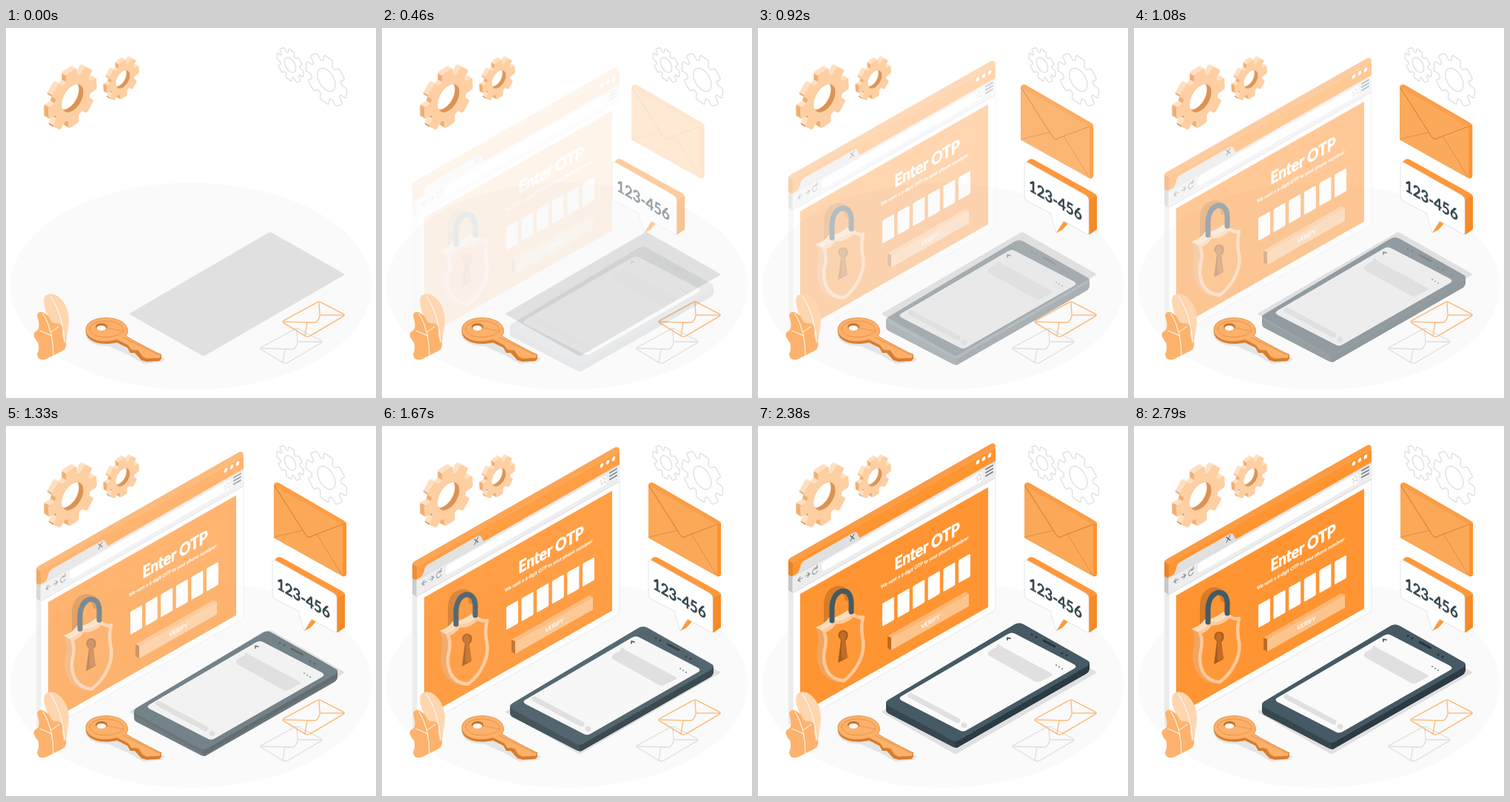
An HTML page that plays this animation: 500 px wide and 500 px high, repeating every 2830 ms.

```html
<!DOCTYPE html>
<html lang="en">
<head>
<meta charset="utf-8">
<title>Enter OTP</title>
<style>
html, body { margin: 0; width: 100%; height: 100%; overflow: hidden; background: #fff; }
svg { display: block; width: 100vw; height: 100vh; }
text { font-family: Lato, "Open Sans", sans-serif; font-weight: 700; stroke-linejoin: round; }
.line { fill: none; stroke-linecap: round; stroke-linejoin: round; }
</style>
</head>
<body>
<svg viewBox="0 0 500 500">
  <defs>
    <g id="letter" class="line">
      <path d="M376 395L420 371Q423 369 426 371L455 386Q459 388 455 390L411 416Q408 418 404 416L376 399Q372 397 376 395Z"/>
      <path d="M423 371L424 388L457 388M375 397L418 398Q422 397 424 389M404 416L407 398"/>
    </g>
  </defs>

  <ellipse cx="250" cy="349" rx="244" ry="140" fill="#fafafa"/>
  <path d="M170 384L354 277Q357 275 360 277L455 331Q459 333 455 335L270 442Q267 444 264 442L169 388Q165 386 170 384Z" fill="#e0e0e0"/>
  <g id="gears"></g>
  <use href="#letter" x="-30" y="36" stroke="#dedede" stroke-width="1.3"/>
  <use href="#letter" stroke="#fdbe83" stroke-width="1.5"/>

  <g id="browser">
    <path d="M41 224L47 228V407L41 404Z" fill="#ebebeb"/>
    <path d="M41 202L47 205V228L41 224Z" fill="#c7c7c7"/>
    <path d="M41 183L47 187V206L41 203Z" fill="#e98326"/>
    <path d="M41 184Q41 182 44 180L315 26Q321 24 321 31L47 187Z" fill="#fb9c44"/>
    <g transform="matrix(1 -.568 0 1 0 182.3)">
      <path d="M47 49H321V246Q321 251 316 251H47Z" fill="#fff" stroke="#e8e8e8"/>
      <path d="M47 31H317Q321 30 321 34V50H47Z" fill="#ff9530"/>
      <path d="M47 49H321V72H47Z" fill="#ededed"/>
      <path d="M50 51Q55 49 57 43Q58 37 62 37H129Q133 37 135 43Q137 50 142 51Z" fill="#e0e0e0"/>
      <path d="M47 50H321M47 72H321" stroke="#dcdcdc" stroke-width="1.2"/>
      <rect x="86" y="53" width="218" height="13" rx="5" fill="#fff"/>
      <g class="line" stroke="#8b9499" stroke-width="1.2">
        <path d="M125 39L130 46M130 39L125 46" stroke="#5d6970"/>
        <path d="M60 59H54M57 56L54 59L57 62M64 59H70M67 56L70 59L67 62M79 56A3.3 4 0 1 0 80 61M80 53V57H77"/>
        <path d="M299 54L300 57H303L301 60L302 63L299 61L296 63L297 60L295 57H298Z" stroke="#d0d0d0" stroke-width=".8"/>
        <path d="M308 53H317M308 57.500H317M308 62H317" stroke="#78838a" stroke-width="2"/>
      </g>
      <g fill="#fff">
        <ellipse cx="297" cy="37" rx="2.300" ry="2.800"/>
        <ellipse cx="305" cy="37" rx="2.300" ry="2.800"/>
        <ellipse cx="313" cy="37" rx="2.300" ry="2.800"/>
      </g>
      <rect x="57" y="79" width="254" height="162" fill="#ff9432"/>
      <g fill="#fff" stroke="#fff">
        <text transform="translate(184.500 119.500) scale(.866 1)" font-size="22" font-weight="900" stroke-width="1">Enter OTP</text>
        <text transform="translate(166 134) scale(.866 1)" font-size="6.800" stroke-width=".15">We sent a 6 digit OTP to your phone numbrer</text>
      </g>
      <g id="boxes" fill="#fff"></g>
      <path d="M175 203H280L285 208L180 208Z" fill="#fdb674"/>
      <path d="M175 203L180 208V225L175 219Z" fill="#bd6b22"/>
      <rect x="180" y="208" width="105" height="17" fill="#fdc48d"/>
      <text transform="translate(233 219.500) scale(.866 1)" font-size="8.500" text-anchor="middle" fill="#fff">VERIFY</text>
    </g>
    <path class="line" d="M93 266V242Q94 225 107 222Q119 221 121 234" stroke="#d67b29" stroke-width="8"/>
    <path d="M78 274Q90 270 96 261Q107 262 121 251Q132 258 144 259L117 348Q99 350 88 337Q77 322 80 303Q84 287 78 274Z" fill="#f0a560"/>
    <path d="M78 274Q90 270 96 261Q107 262 121 251L130 256Q118 268 104 266Q98 276 87 279Z" fill="#fedcbc"/>
    <path d="M89 279Q99 276 104 267Q117 269 129 257Q136 262 142 260Q139 272 141 286Q145 302 138 318Q130 336 116 346Q100 345 93 332Q86 317 91 300Q93 289 89 279Z" fill="#ff9838" stroke="#fec99a" stroke-width="4.500" stroke-linejoin="round"/>
    <path class="line" d="M100 265V247Q101 229 113 225Q125 224 126 239V253" stroke="#455a64" stroke-width="7"/>
    <path d="M112 291Q106 286 110 280Q116 275 121 281Q123 288 118 292L121 315L108 322Z" fill="#a85c1c"/>
    <path d="M113 291Q108 286 112 281L115 279Q122 282 117 292L121 315L113 317Z" fill="#c16d27"/>
  </g>

  <g id="phone">
    <path d="M173 375V385Q173 389 177 391L262 435Q267 438 272 435L443 337Q448 334 448 329V322Z" fill="#37474f"/>
    <path d="M267 426V437Q270 437 272 435L443 337Q448 334 448 329V322Z" fill="#2b3b43"/>
    <path d="M176 372L345 271Q352 266 359 270L444 318Q452 322 444 327L273 426Q267 430 261 426L176 380Q170 376 176 372Z" fill="#455a64"/>
    <path d="M194 367L338 283Q343 280 348 283L427 324Q432 327 427 330L282 413Q277 416 272 413L194 373Q189 370 194 367Z" fill="#fafafa"/>
    <path d="M314 305L322 301L324 296L329 300L396 336Q400 338 396 340L382 347Q378 349 374 347L313 313Q308 309 314 305Z" fill="#e0e0e0"/>
    <path class="line" d="M206 366L270 400M278 406L279 406.500" stroke="#e0e0e0" stroke-width="7"/>
    <g class="line" stroke="#263238" stroke-width="2.800">
      <path d="M386 292L401 300M370 284h.1M376 287h.1M411 309h.1M417 312h.1"/>
      <path d="M341 289L337 288L337 291M403 325h.1M407 327.500h.1M411 330h.1" stroke-width="1.700" stroke="#45545c"/>
    </g>
  </g>

  <g id="envelope">
    <path d="M360 79Q362 75 367 77L455 128Q458 130 458 133V200Q457 204 453 203L360 151Z" fill="#fb9d45"/>
    <path d="M453 133L458 130V200Q457 204 453 203Z" fill="#ff912c"/>
    <path d="M360 80L453 133V203L360 151Z" fill="#fba858"/>
    <path class="line" d="M361 81L403 147Q407 153 413 148L453 133" stroke="#d98637" stroke-width="1.300"/>
    <path class="line" d="M361 150L399 141M418 146L452 201" stroke="#df8b3c"/>
  </g>

  <g id="bubble">
    <path d="M360 184L366 178Q369 176 373 178L454 223Q458 225 458 229V272L448 279L420 263L411 273L403 277L400 250L362 230Z" fill="#ff983a"/>
    <path d="M447 233L458 227V272L448 279Z" fill="#f58a27"/>
    <path d="M360 185Q360 180 365 182L443 226Q447 229 447 233V276Q447 280 443 278L413 261L403 277L395 250L364 234Q360 232 360 228Z" fill="#fff" stroke="#dedede" stroke-width=".8"/>
    <text transform="matrix(.866 .5 0 1 366 219.500)" font-size="21.500" fill="#37474f" stroke="#37474f" stroke-width=".3">123-456</text>
  </g>

  <g id="plant">
    <path d="M54 361Q68 354 80 374Q88 389 83 411L80 435L66 437Q67 409 55 385Q48 367 54 361Z" fill="#fed6b0"/>
    <path d="M42 389Q43 383 49 384Q57 387 60 394Q62 400 70 399Q78 401 76 410Q75 419 81 425Q83 432 75 437Q65 442 53 448Q43 450 42 441Q46 432 43 425Q34 414 40 410Q48 407 42 389Z" fill="#fdb36d"/>
    <path class="line" d="M60 362Q78 390 79 425M50 386Q64 408 64 442M61 411L72 403M62 416L46 409" stroke="#fff" stroke-width="1"/>
  </g>

  <g id="key">
    <path d="M107 411Q108 430 139 430L166 442L186 454L211 451L215 447L165 417Z" fill="#e5e5e5"/>
    <path d="M108 408V412C110 424 128 430 150 425L164 432L168 439L174 439L183 449L190 451L207 450L210 447V441Z" fill="#d87d2d"/>
    <path d="M108 407C109 388 152 387 162 402Q167 410 162 416L168 420L210 442L208 446L190 447L184 444L179 436L169 435L165 429L150 421C128 428 107 420 108 407Z" fill="#fdb069" stroke="#d98739" stroke-width=".8"/>
    <path d="M113 407C114 393 149 392 158 405C164 418 117 425 113 407ZM158 418L207 442" class="line" stroke="#e4944d" stroke-width="1"/>
    <path d="M136 405L160 410" stroke="#e4944d" stroke-width=".8"/>
    <ellipse cx="129" cy="404" rx="8" ry="5" fill="#c87427"/>
    <ellipse cx="129" cy="405.500" rx="6.500" ry="3.500" fill="#fafafa"/>
  </g>
</svg>
<script>
const LOOP = 2830;
const $ = id => document.getElementById(id);

// Points of a gear or circle, laid on an isometric wall that leans up (-1) or down (1) to the right.
const onWall = (cx, cy, lean) => (r, a) => [
  cx + .866 * r * Math.cos(a),
  cy + r * Math.sin(a) + lean * .5 * r * Math.cos(a)
];
const outline = points => "M" + points.map(p => p.map(v => v.toFixed(1)).join(" ")).join("L") + "Z";

function gearShape(cx, cy, radius, hole, lean, phase) {
  const place = onWall(cx, cy, lean), step = Math.PI / 4;
  const rim = [], bore = [];
  for (let i = 0; i < 8; i++) {
    const a = i * step + phase;
    for (const [r, d] of [[.75, -.3], [.97, -.22], [1, -.16], [1, .16], [.97, .22], [.75, .3]])
      rim.push(place(radius * r, a + d));
  }
  for (let i = 0; i < 32; i++) bore.push(place(hole, i * Math.PI / 16));
  return { rim, bore };
}

// Sides of an extruded outline that face the viewer.
function walls(points, [dx, dy], inside) {
  return points.map((p, i) => {
    const q = points[(i + 1) % points.length];
    const nx = q[1] - p[1], ny = p[0] - q[0];
    if ((nx * dx + ny * dy > 0) === inside) return "";
    const top = -ny / Math.hypot(nx, ny);
    const fill = inside ? "#dc904e" : top > .45 ? "#ffdfc0" : top > -.1 ? "#f3ae70" : "#dc904e";
    const quad = outline([p, q, [q[0] + dx, q[1] + dy], [p[0] + dx, p[1] + dy]]);
    return `<path d="${quad}" fill="${fill}" stroke="${fill}" stroke-width=".3"/>`;
  }).join("");
}

function solidGear(cx, cy, radius, hole, depth) {
  const { rim, bore } = gearShape(cx, cy, radius, hole, -1, -.05);
  const back = [-depth, -depth * .577];
  return walls(rim, back, false) + walls(bore, back, true) +
    `<path d="${outline(rim) + outline(bore)}" fill="#fdcfa2" fill-rule="evenodd"/>`;
}

function lineGear(cx, cy, radius, hole) {
  const { rim, bore } = gearShape(cx, cy, radius, hole, 1, .1);
  return `<path class="line" d="${outline(rim) + outline(bore)}" stroke="#dedede" stroke-width="1.3"/>`;
}

$("gears").innerHTML =
  solidGear(90, 95, 38, 17, 6) + solidGear(158, 69.5, 25.5, 11, 4.5) +
  lineGear(433, 70, 32, 14) + lineGear(384, 50, 21, 9);

$("boxes").innerHTML = Array.from({ length: 6 }, (_, i) =>
  `<rect x="${168 + 20.6 * i}" y="155" width="16" height="31" rx="1.500"/>`).join("");

// cubic-bezier(.36, -.01, .5, 1.38)
function ease(x) {
  if (x <= 0) return 0;
  if (x >= 1) return 1;
  const curve = (s, a, b) => 3 * (1 - s) ** 2 * s * a + 3 * (1 - s) * s * s * b + s ** 3;
  let low = 0, high = 1;
  for (let i = 0; i < 24; i++) {
    const mid = (low + high) / 2;
    if (curve(mid, .36, .5) < x) low = mid; else high = mid;
  }
  return curve(low, -.01, 1.38);
}

const entrances = [
  { id: "browser", start: 10, time: 2780, dx: 0, dy: 30 },
  { id: "phone", start: 10, time: 2780, dx: 0, dy: 30 },
  { id: "envelope", start: 50, time: 1580, dx: -30, dy: 0 },
  { id: "bubble", start: 190, time: 720, dx: -95, dy: 0 }
];

function draw() {
  const now = performance.now() % LOOP;
  for (const { id, start, time, dx, dy } of entrances) {
    const k = ease((now - start) / time);
    $(id).setAttribute("transform", `translate(${dx * (1 - k)} ${dy * (1 - k)})`);
    $(id).setAttribute("opacity", Math.min(1, Math.max(0, k)));
  }
  requestAnimationFrame(draw);
}
draw();
</script>
</body>
</html>
```
